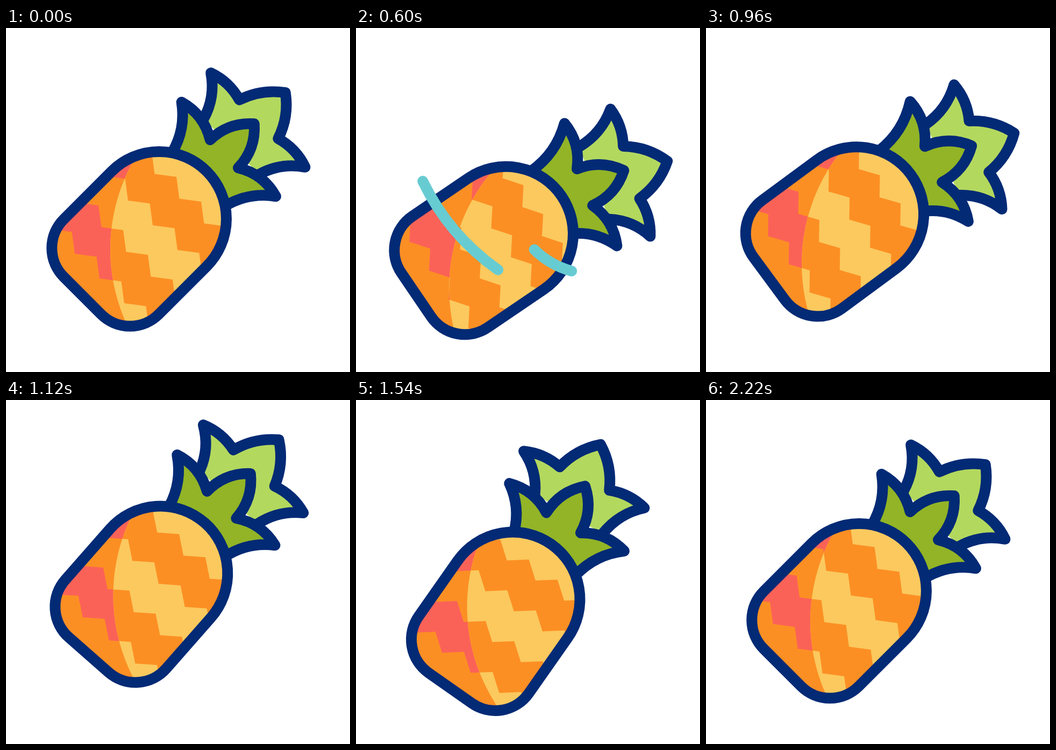
Write an HTML page with a canvas that moves like this. It is 640 px wide and 640 px high and loops after 2.4 s.

```html
<!DOCTYPE html>
<html lang="en">
<head>
<meta charset="utf-8">
<title>Spinning pineapple</title>
<style>
  html, body { margin: 0; height: 100%; overflow: hidden; background: #fff; }
  canvas { display: block; }
</style>
</head>
<body>
<canvas id="stage" width="640" height="640"></canvas>
<script>
const ctx = document.getElementById('stage').getContext('2d');
const LOOP = 2400, RAD = Math.PI / 180;
const NAVY = '#032a75', ORANGE = '#fc8f24', YELLOW = '#fbc95e', RED = '#fb6257',
      GREEN = '#92b426', LIME = '#b3d85e', TEAL = '#67ccd2';
const CELL = 65, CELLS_PER_TURN = 12;

// Key poses: ms, then the body's height, or the degrees of body, front and back leaf
const HOPS = [0, 39, -40, 26, 0].map((y, i) => [200 + 500 * i, y]);
const SWINGS = [
  [250, 0, 0, 0],
  [790, 15, 15.4, 8.1],
  [1380, -16.6, -8.3, -8],
  [1845, 7.6, 5.1, 1.7],
  [2220, 0, 0, 0],
];

// Left half of each upright leaf: base, side tip, notch, top
const FRONT = [[-70, -104], [-124, -183], [-37, -171], [0, -250]];
const BACK = [[-73, -190], [-124, -260], [-51, -262], [0, -332]];

const body = new Path2D('M-125 0A125 125 0 0 1 125 0V126A76 76 0 0 1 49 202H-49A76 76 0 0 1-125 126Z');
const lit = new Path2D();
lit.arc(212.5, -132.6, 335, 0, 7);

const clamp = (x, low = 0) => Math.min(1, Math.max(low, x));

// Eases from key to key, resting at each
function pose(keys, t) {
  let i = 0;
  while (i < keys.length - 2 && t > keys[i + 1][0]) i++;
  const [t0, ...from] = keys[i], [t1, ...to] = keys[i + 1];
  const u = clamp((t - t0) / (t1 - t0)), e = u * u * (3 - 2 * u);
  return from.map((v, k) => v + (to[k] - v) * e);
}

// One turn whose speed rises and falls like a half circle
function turn(t) {
  const u = clamp((t - 1235) / 1035, -1);
  return 0.5 + (u * Math.sqrt(1 - u * u) + Math.asin(u)) / Math.PI;
}

function stroke(color, path) {
  ctx.strokeStyle = color;
  path ? ctx.stroke(path) : ctx.stroke();
}

// Curve whose control point lies left of the chord by a share of its length
function bend([x0, y0], [x1, y1], share) {
  ctx.quadraticCurveTo((x0 + x1) / 2 + (y1 - y0) * share, (y0 + y1) / 2 - (x1 - x0) * share, x1, y1);
}

// The crown turns about (0, pivot) while its base stays put
function leaf(color, half, pivot, angle, bulge) {
  const c = Math.cos(angle), s = Math.sin(angle);
  const all = [...half, ...half.slice(0, -1).reverse().map(([x, y]) => [-x, y])];
  const last = all.length - 1;
  const pts = all.map(([x, y], i) => i % last
    ? [x * c - (y - pivot) * s, pivot + x * s + (y - pivot) * c] : [x, y]);
  ctx.beginPath();
  ctx.moveTo(...pts[0]);
  for (let i = 1; i <= last; i++) bend(pts[i - 1], pts[i], i % last === 1 || i === last ? -0.18 : bulge);
  ctx.fillStyle = color;
  ctx.fill();
  stroke(NAVY);
}

function bands(ground, band, shift) {
  ctx.fillStyle = ground;
  ctx.fillRect(-140, -140, 280, 360);
  ctx.fillStyle = band;
  for (const top of [-53, 87]) {
    ctx.beginPath();
    const point = (i, y) => ctx.lineTo(shift + i * CELL / 2, y - (i % 2 ? 24.8 : 0));
    for (let i = -7; i <= 5; i++) point(i, top);
    for (let i = 5; i >= -7; i--) point(i, top + 70);
    ctx.fill();
  }
}

function swoosh(t, start, from, to, bulge) {
  const head = clamp((t - start) / 150), tail = clamp((t - start - 190) / 150);
  if (head <= tail) return;
  const length = 1.03 * Math.hypot(to[0] - from[0], to[1] - from[1]);
  ctx.beginPath();
  ctx.moveTo(...from);
  bend(from, to, bulge);
  ctx.setLineDash([(head - tail) * length, 2 * length]);
  ctx.lineDashOffset = -tail * length;
  stroke(TEAL);
  ctx.setLineDash([]);
}

function draw(t) {
  const [hop] = pose(HOPS, t);
  const [tilt, sway, lag] = pose(SWINGS, t).map(degrees => degrees * RAD);
  const shift = turn(t) * CELLS_PER_TURN % 1 * CELL;
  ctx.setTransform(1, 0, 0, 1, 0, 0);
  ctx.fillStyle = '#fff';
  ctx.fillRect(0, 0, 640, 640);
  ctx.lineWidth = 20;
  ctx.lineCap = ctx.lineJoin = 'round';

  ctx.translate(320, 320 + hop);
  ctx.rotate(tilt);
  ctx.translate(-35, 35);
  ctx.rotate(45 * RAD);

  ctx.save();
  ctx.translate(0, -115);
  ctx.rotate(sway);
  ctx.translate(0, 115);
  leaf(LIME, BACK, -175, lag, 0.16);
  ctx.restore();
  leaf(GREEN, FRONT, -115, sway, 0.22);

  ctx.save();
  ctx.clip(body);
  bands(ORANGE, RED, shift);
  ctx.clip(lit);
  bands(YELLOW, ORANGE, shift);
  ctx.restore();
  stroke(NAVY, body);

  swoosh(t, 420, [-168, 73], [47, 50], -0.13);
  swoosh(t, 440, [54, -27], [126, -62], -0.13);
}

function tick() {
  draw(performance.now() % LOOP);
  requestAnimationFrame(tick);
}
tick();
</script>
</body>
</html>
```
